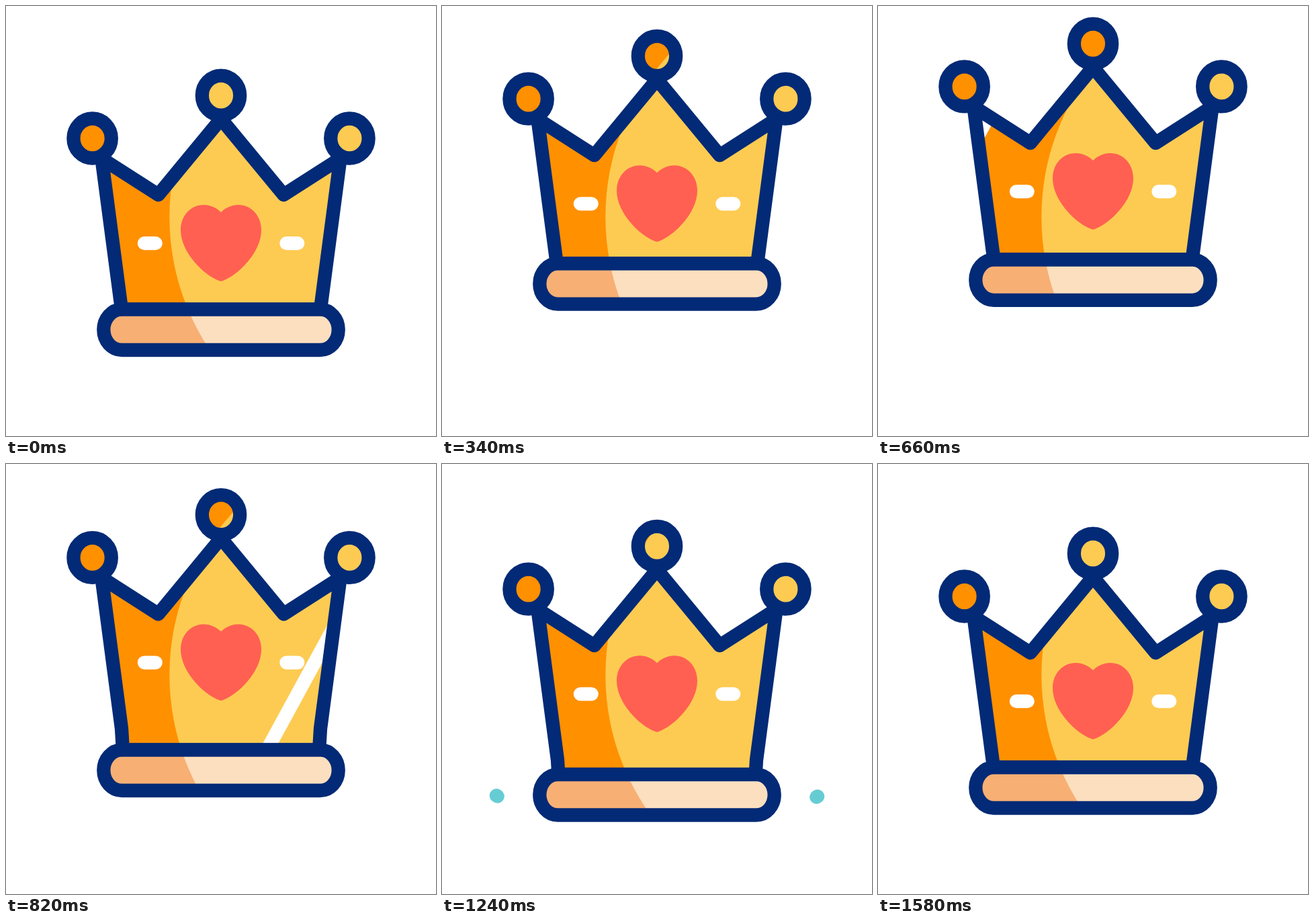
An HTML page that plays this animation: 640 by 640 pixels, repeating every 3.6 s.

```html
<!DOCTYPE html>
<html lang="en">
<head>
<meta charset="utf-8">
<title>Crown</title>
<style>
  html, body { margin: 0; width: 100%; height: 100%; overflow: hidden; background: #fff; }
  svg { display: block; width: 100vw; height: 100vh; }
  .ink { fill: none; stroke: #032a76; stroke-width: 20.3; stroke-linejoin: round; stroke-linecap: round; }
  .orange { fill: #ff9000; }
  .yellow { fill: #fdcb52; }
  .spark { stroke: #66ccd3; stroke-width: 20.5; stroke-linecap: round; }
</style>
</head>
<body>
<svg viewBox="0 0 640 640">
  <defs>
    <clipPath id="bodyClip"><path class="body"/></clipPath>
    <clipPath id="gemClip"><ellipse class="gem" cx="320" rx="28.2" ry="29.5"/></clipPath>
    <clipPath id="baseClip"><rect class="base" x="145.3" width="349.4" height="60.4" rx="27" ry="30.2"/></clipPath>
  </defs>

  <line class="spark"/>
  <line class="spark"/>

  <g clip-path="url(#bodyClip)">
    <rect class="orange" width="640" height="640"/>
    <circle class="yellow" cx="600.3" cy="314" r="357"/>
    <g class="top">
      <path fill="#ff6052" d="M320 307C313 300 304 296 294.5 296C275 296 260 312 260 333.5C260 367 295 401 317.5 409Q320 410 322.5 409C345 401 380 367 380 333.5C380 312 365 296 345.5 296C336 296 327 300 320 307Z"/>
      <rect x="195.8" y="343" width="37" height="20.3" rx="10.1" fill="#fff"/>
      <rect x="407.3" y="343" width="37" height="20.3" rx="10.1" fill="#fff"/>
    </g>
    <path id="shine" d="M173 100L-45 500" stroke="#fff" stroke-width="20.3"/>
  </g>
  <path class="body ink"/>

  <g clip-path="url(#gemClip)">
    <rect class="orange" width="640" height="640"/>
    <circle class="yellow" cx="600.3" cy="314" r="357"/>
  </g>
  <ellipse class="gem ink" cx="320" rx="28.2" ry="29.5"/>
  <g class="top">
    <ellipse class="orange" cx="128.6" cy="197" rx="28.2" ry="29.5"/>
    <ellipse class="yellow" cx="511.4" cy="197" rx="28.2" ry="29.5"/>
    <ellipse class="ink" cx="128.6" cy="197" rx="28.2" ry="29.5"/>
    <ellipse class="ink" cx="511.4" cy="197" rx="28.2" ry="29.5"/>
  </g>

  <g clip-path="url(#baseClip)">
    <rect width="640" height="640" fill="#f7af74"/>
    <circle cx="600.3" cy="314" r="357" fill="#fcdfbf"/>
  </g>
  <rect class="base ink" x="145.3" width="349.4" height="60.4" rx="27" ry="30.2"/>
</svg>
<script>
const LOOP = 3600, STEP = 20;
const all = s => [...document.querySelectorAll(s)];
const set = (list, attrs) => list.forEach(el => {
  for (const k in attrs) el.setAttribute(k, attrs[k]);
});

const clamp = u => Math.min(1, Math.max(0, u));
const powIn = p => u => u ** p;
const powOut = p => u => 1 - (1 - u) ** p;
const sineOut = u => Math.sin(u * Math.PI / 2);
const smooth = u => (1 - Math.cos(u * Math.PI)) / 2;

// Each key: time, value, easing used to arrive there
const topKeys = [
  [0, 0], [620, -77.5, sineOut], [980, 4, powIn(2.4)],
  [1140, -16.5, sineOut], [1390, 0, smooth]
];
const baseKeys = [
  [0, 0], [570, -78, powOut(2.3)], [875, 8, powIn(2.53)],
  [1010, -12.2, sineOut], [1240, 10.5, smooth], [1580, 0, smooth]
];

function track(keys, t) {
  for (let i = 1; i < keys.length; i++) {
    const [t0, v0] = keys[i - 1], [t1, v1, ease] = keys[i];
    if (t < t1) return v0 + (v1 - v0) * ease((t - t0) / (t1 - t0));
  }
  return keys[keys.length - 1][1];
}

// The sides run straight to their foot, then lean less down to the base
function bodyPath(top, base) {
  const foot = 451.5 + top, low = Math.max(foot, 451.5 + base);
  const lean = 0.06 * (low - foot);
  const half = [
    [172 + lean, low], [172, foot], [142.4, 227 + top], [226.7, 281 + top]
  ];
  const other = half.map(([x, y]) => [640 - x, y]).reverse();
  return "M" + [...half, [320, 168 + top], ...other].join("L") + "Z";
}

const bodies = all(".body"), gems = all(".gem"), bases = all(".base");
const tops = all(".top"), sparks = all(".spark"), shine = all("#shine");

function drawSparks(t) {
  const head = powOut(2.3)(clamp((t - 880) / 300));
  const tail = powOut(2.07)(clamp((t - 900) / 420));
  const x = u => 130 - 49 * u, y = u => 523 - 29.5 * u;
  const visibility = t > 880 && t < 1320 ? "visible" : "hidden";
  sparks.forEach((el, i) => {
    const side = u => i ? 640 - x(u) : x(u);
    const drop = i ? 1.2 : 0;
    set([el], {
      x1: side(tail), y1: y(tail) + drop,
      x2: side(head), y2: y(head) + drop, visibility
    });
  });
}

function draw(t) {
  const top = track(topKeys, t), base = track(baseKeys, t);
  set(bodies, { d: bodyPath(top, base) });
  set(gems, { cy: 133.2 + top });
  set(bases, { y: 451.6 + base });
  set(tops, { transform: `translate(0 ${top})` });
  set(shine, {
    transform: `translate(${26.5 + 2.29 * (t - 660)} 0)`,
    visibility: t > 620 && t < 900 ? "visible" : "hidden"
  });
  drawSparks(t);
}

const start = performance.now();
function tick() {
  const t = (performance.now() - start) % LOOP;
  draw(Math.floor(t / STEP) * STEP);
  requestAnimationFrame(tick);
}
tick();
</script>
</body>
</html>
```
